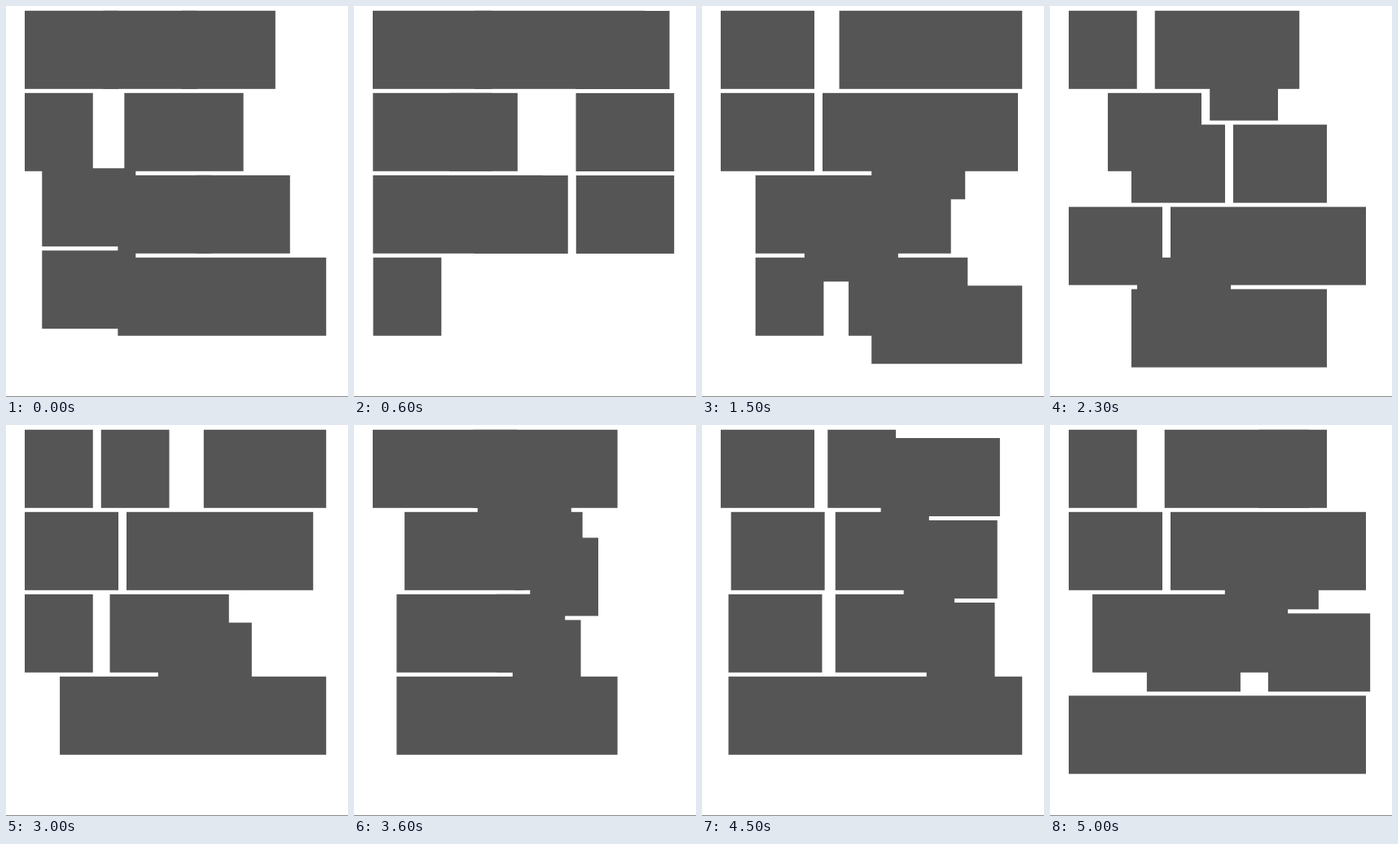
Recreate the animation shown at these times as an HTML page with a canvas. Size 420 by 480 pixels, loop 5100 ms.

```html
<!DOCTYPE html>
<html lang="en">
<head>
<meta charset="utf-8">
<title>Reflowing grid</title>
<style>
  html, body { margin: 0; width: 420px; height: 480px; overflow: hidden; background: #fff; }
  canvas { display: block; }
</style>
</head>
<body>
<canvas id="stage" width="420" height="480"></canvas>
<script>
const LOOP = 5100, STEP = 700, FIRST = -100, MOVE = 500;
const COL = 31.25, ROW = 101, GAP = 10, LEFT = 23, TOP = 5.8, HEIGHT = 96, CLIP_RIGHT = 393.2;

// Ten boxes on a 12-column grid: each group is a row, each base-36 digit a span.
const layouts = [
  '336 48 435 48',
  '444 354 444 c',
  '57 453 57 453',
  '48 48 48 435 c',
  '363 444 48 48',
  '336 453 354 c',
  '66 453 363 39',
  '435 444 453 c',
  '363 48 48 48 c'
].map(place);

// When each reflow starts to move; spans switch on the regular step.
const starts = [-101, 585, 1298, 2017, 2705, 3407, 4112, 4834];

const ctx = document.getElementById('stage').getContext('2d');

function place(text) {
  return text.split(' ').flatMap((digits, row) => {
    let col = 0;
    return [...digits].map(digit => {
      const span = parseInt(digit, 36);
      const box = { row, col, span };
      col += span;
      return box;
    });
  });
}

// cubic-bezier(.42, 0, .58, 1)
function easeInOut(x) {
  if (x <= 0) return 0;
  if (x >= 1) return 1;
  let lo = 0, hi = 1, s;
  for (let i = 0; i < 24; i++) {
    s = (lo + hi) / 2;
    const bx = 3 * s * (1 - s) * (0.42 * (1 - s) + 0.58 * s) + s ** 3;
    if (bx < x) lo = s; else hi = s;
  }
  return s * s * (3 - 2 * s);
}

const mix = (a, b, p) => a + (b - a) * p;

function draw(time) {
  const step = Math.floor((time - FIRST) / STEP);
  const p = easeInOut((time - starts[step]) / MOVE);
  const from = layouts[step], to = layouts[step + 1];

  ctx.fillStyle = '#fff';
  ctx.fillRect(0, 0, 420, 480);
  ctx.fillStyle = '#888';
  ctx.fillRect(0, 479, 420, 1);

  ctx.fillStyle = '#555';
  to.forEach((box, i) => {
    const x = LEFT + COL * mix(from[i].col, box.col, p);
    const y = TOP + ROW * mix(from[i].row, box.row, p);
    const right = Math.min(x + box.span * COL - GAP, CLIP_RIGHT);
    ctx.fillRect(x, y, right - x, HEIGHT);
  });
}

function tick() {
  draw(performance.now() % LOOP);
  requestAnimationFrame(tick);
}
tick();
</script>
</body>
</html>
```
